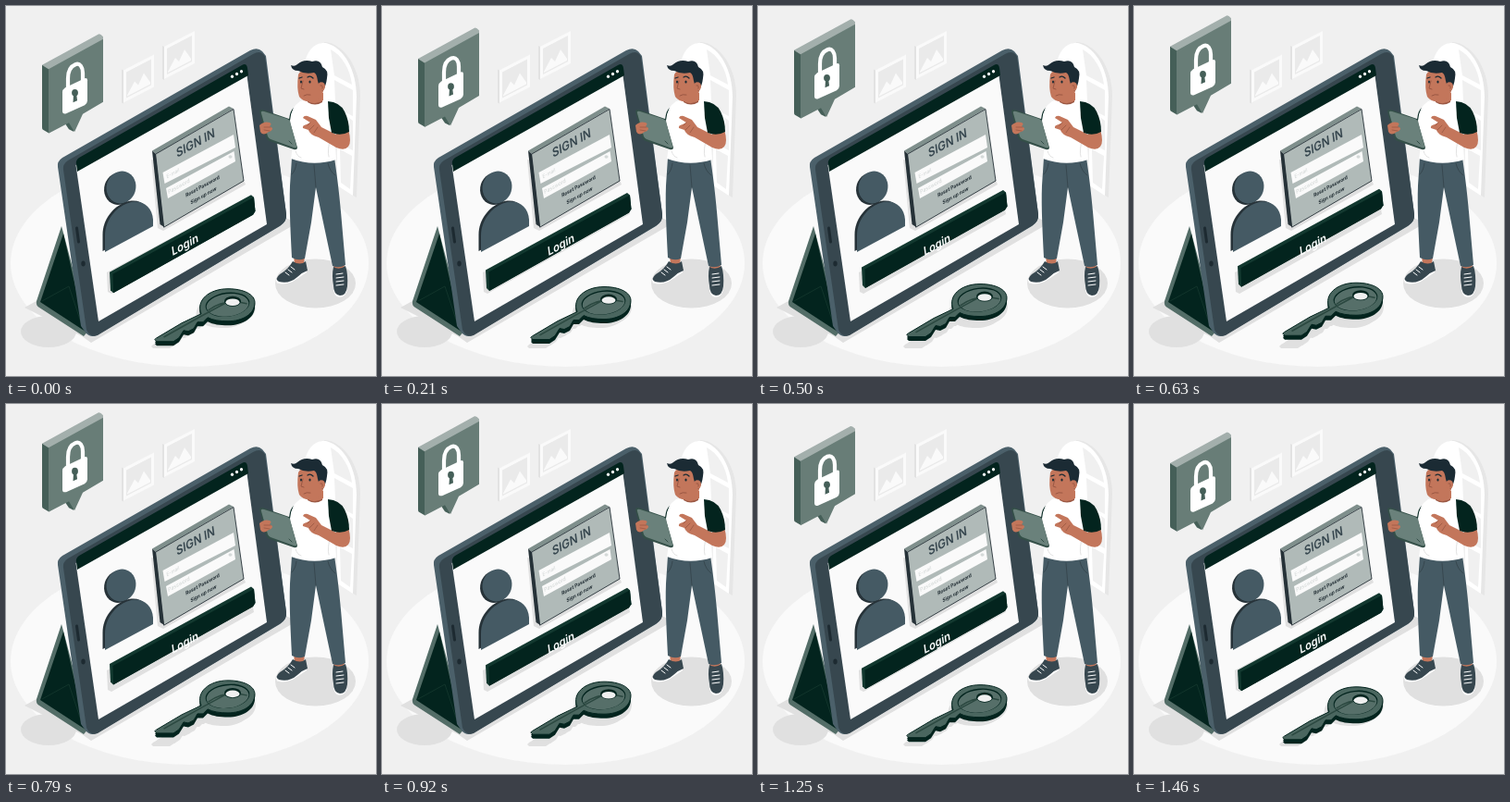
An HTML page with a canvas that plays this animation: 400x400 px, repeating every 1500 ms.

```html
<!DOCTYPE html>
<html lang="en">
<head>
<meta charset="utf-8">
<title>Sign in</title>
<style>
html, body { margin: 0; width: 100%; height: 100%; overflow: hidden; background: #f0f0f0; }
canvas { display: block; width: 100vw; height: 100vh; }
</style>
</head>
<body>
<canvas id="stage" width="400" height="400"></canvas>
<script>
const ctx = document.getElementById('stage').getContext('2d');
const LOOP = 1500, STEPS = 36;
const GREEN = '#03241e', SLATE = '#455a64', DARK = '#37474f', INK = '#263238';
const SHADE = '#e0e0e0', SKIN = '#c3765b', SKIN_DARK = '#9a5743';

function fill(color, d) {
  ctx.fillStyle = color;
  ctx.fill(new Path2D(d));
}

function line(color, width, d) {
  ctx.strokeStyle = color;
  ctx.lineWidth = width;
  ctx.lineCap = ctx.lineJoin = 'round';
  ctx.stroke(new Path2D(d));
}

function oval(color, x, y, rx, ry, turn = 0) {
  ctx.fillStyle = color;
  ctx.beginPath();
  ctx.ellipse(x, y, rx, ry, turn, 0, Math.PI * 2);
  ctx.fill();
}

function moved(dx, dy, draw) {
  ctx.save();
  ctx.translate(dx, dy);
  draw();
  ctx.restore();
}

// Text lying in the plane of the tilted screen, centred on x, y.
function label(text, x, y, font, color) {
  ctx.save();
  ctx.transform(0.84, -0.465, 0.13, 1, x, y);
  ctx.font = font;
  ctx.textAlign = 'center';
  ctx.textBaseline = 'middle';
  ctx.fillStyle = color;
  ctx.fillText(text, 0, 0);
  ctx.restore();
}

function picture() {
  fill('#e2e2e2', 'M-1 17L1 18V54L-1 53Z');
  fill('#fafafa', 'M1 18L34 1V36L1 53Z');
  fill('#eaeaea', 'M4 20L31 6V34L4 48Z');
  fill('#fafafa', 'M5 45L13 30L17 34L23 21L30 31V33L5 46Z');
}

function room() {
  fill('#f0f0f0', 'M0 0H400V400H0Z');
  oval('#fafafa', 198.5, 278, 193.5, 112);
  moved(126, 51.5, picture);
  moved(170, 26, picture);
  fill('#e6e6e6', 'M344 39C366 40 383 68 383 97L379 207L374 204Z');
  fill('#fff', 'M322 130V66C325 47 334 39 346 40C366 45 379 70 379 98L375 205L358 194V130Z');
  fill('#f0f0f0', 'M351 47C363 53 372 68 374 85L355 75Z');
  fill('#f0f0f0', 'M355 80L375 91V119L367 115L356 104Z');
  fill('#f0f0f0', 'M371 121L375 124V156L361 149V142L371 149Z');
  fill('#f0f0f0', 'M361 155L374 162L372 198L362 191Z');
  oval(SHADE, 46, 352, 30, 17);
  oval(SHADE, 334.5, 300, 43.5, 26.5);
  fill(SHADE, 'M20 326L60 304L290 222L314 235L92 364L82 357Z');
}

function tablet() {
  fill('#536d67', 'M60 238L33 319Q32 324 36 326L84 357L90 350Z');
  fill(GREEN, 'M62 246L37 320L86 352Z');
  line('#16392f', 0.8, 'M39 319L68 303L83 348');

  fill('#4b606a', 'M56 174Q55 168 61 164L264 48Q272 44 277 49L281 54L303 225Q304 233 296 238L98 356Q91 359 86 353L81 346Z');
  fill(DARK, 'M62 177Q61 171 67 167L267 52Q276 47 280 55L303 225Q304 232 297 237L99 356Q91 359 87 350Z');
  fill('#fafafa', 'M75.500 172L259 64L282 236L100 341Z');
  fill(GREEN, 'M76 171Q75 167 79 164L255 64Q260 61 261 67L262 75L77 179Z');
  for (let i = 0; i < 3; i++) oval('#fff', 244.5 + i * 5, 76.3 - i * 2.8, 1.6, 1.8);
  line('#1d2a31', 3, 'M76.5 240L78.5 255');
  oval('#1d2a31', 83.5, 278.5, 2.2, 3);
}

function avatar() {
  const body = 'M107 266V248C107 232 118 218 132 213C147 208 158 217 159 231V238Z';
  oval(INK, 122, 197.5, 15.8, 17.6, 0.3);
  oval(SLATE, 124.5, 196, 15.8, 17.6, 0.3);
  moved(-2.5, -1, () => fill(INK, body));
  fill(SLATE, body);
}

function form() {
  fill(SHADE, 'M157 166L164 240L170 243L259 193L257 188Z');
  fill('#7f8f8c', 'M158 156.500L241 108.500L246 111L162 160Z');
  fill(INK, 'M158 156.500L162 160L171 239L166.500 236Z');
  fill('#b0bab8', 'M162 160L246 111.500L257 189L171 239Z');
  line(INK, 0.9, 'M162 160L246 111.500L257 189L171 239Z');
  label('SIGN IN', 205, 148.5, '600 13.300px Inter, sans-serif', DARK);
  fill('#fafafa', 'M169.500 180L246 139L248 153L171.500 192Z');
  fill('#fafafa', 'M173 197L246.500 157L248 168L175 208Z');
  label('E-mail', 180.5, 181, '5.500px Inter, sans-serif', '#cfd4d3');
  label('Password', 187, 195, '6px Inter, sans-serif', '#cfd4d3');
  oval('#d5dad9', 242.5, 163, 2, 1.8);
  label('Reset Password', 212.5, 195, 'bold 5.600px Inter, sans-serif', INK);
  label('Sign up now', 213.5, 205, 'bold 5.600px Inter, sans-serif', INK);
}

function button(lift) {
  fill(SHADE, 'M109 288L264 205L268 225L114 311L110 309Z');
  moved(0, -lift, () => {
    fill('#12382f', 'M112 288L265 204.500L268 207L269.500 222L267 226L116 310.500L113 307.500Z');
    fill(GREEN, 'M115.500 290L268 207L269.500 222L267 226L116 310.500Z');
  });
  label('Login', 193.5, 258.5, '600 12.800px Inter, sans-serif', '#fff');
}

const KEY = 'M163 359L190 343L211 333C205 319 219 306 240 306C257 306 269 312 269 321C269 333 256 341 240 341C231 341 224 340 218 337L213 342L207 342L203 349L197 352L192 351L187 359L181 363H163L161 361Z';

function key(lift) {
  moved(-4, 7, () => fill(SHADE, KEY));
  moved(1, 4, () => fill(SHADE, KEY));
  moved(0, -lift, () => {
    moved(0, 4.5, () => fill(GREEN, KEY));
    moved(0, 2.5, () => fill(GREEN, KEY));
    fill('#4a665f', KEY);
    line(GREEN, 1, KEY);
    ctx.save();
    ctx.translate(239.5, 323);
    ctx.rotate(-0.12);
    oval(GREEN, 0, 0, 24, 13);
    oval('#566f69', 0, 0.6, 23, 12.2);
    ctx.restore();
    line('#2b4840', 1.5, 'M171 358L212 335L238 321M219 329Q237 316 260 322');
    oval(GREEN, 245, 319.5, 9, 5.5);
    oval('#f0f0f0', 245, 320.5, 7.5, 3.8);
  });
}

function bubble(lift) {
  moved(0, -lift, () => {
    fill('#a3afac', 'M39 64.500L100 31.200Q102 30.500 105 34V37L47 70Z');
    fill('#455f58', 'M39 64.500L46 69V138L40 134.500Q39 134 39 132Z');
    fill('#455f58', 'M62 125L68 134L73 136.500L73 122Z');
    fill('#687d77', 'M46 69L105 36.500V104.500L83 117.500L74 137L68 127L46 138.500Z');
    line('#fff', 4.2, 'M67 91V79C67 71 70 66 75 64C80 62 83 67 83 73V83');
    fill('#fff', 'M61 94Q61 91 64 89L85 79Q88 78 88 81V103Q88 106 85 108L65 117Q61 118 61 114Z');
    oval('#455f58', 74.5, 94.5, 3.4, 3.8);
    fill('#455f58', 'M73 96L76 95L77 103L72.500 105Z');
  });
}

function shoes() {
  fill(SKIN, 'M311 269H323L322 280L312 281ZM354 278H366L365 289L355 289Z');
  fill('#fff', 'M291.500 295L293 299.500Q302 302 310 298L325 288V284Z');
  fill(DARK, 'M310 276Q318 281 324 276L326 286Q320 288 315 293Q306 301 295 298Q290 295 296 290Q305 285 310 276Z');
  line('#fff', 1, 'M302 288L306 291M305 285L309 288M308 282L312 285');
  fill('#fff', 'M354 304Q354 315 361 315Q369 314 369 303Z');
  fill(DARK, 'M354 282Q360 286 367 281Q370 290 369 303Q368 313 361 313Q354 312 354 302Q352 291 354 282Z');
  line('#fff', 1, 'M357 290L364 289M357 294L365 293M357 298L365 297M357 302L365 301');
}

function man() {
  shoes();
  fill(SLATE, 'M309 164H355C358 184 361 208 363 234L367 280Q360 284 353 281L343 234L335 196L330 234L323 273Q316 276 309 272C308 250 306 218 307 194Z');
  line(DARK, 1, 'M333 172L335 196M314 170Q313 178 309 182M348 170Q350 179 356 183');

  fill(GREEN, 'M311 110Q307 113 306 123L309 128Z');
  fill('#fff', 'M318 103Q332 99 348 102Q356 105 356 118L355 141L357 166Q332 174 308 165L311 146L307 124Q308 109 318 103Z');
  line('#e2e2e2', 1, 'M313 157Q315 163 319 164M351 142Q347 156 349 163');
  fill(SKIN_DARK, 'M326 94H342V104Q334 109 326 104Z');
  fill(SKIN, 'M330 94H343V102Q335 107 328 104Z');

  // Head
  fill(SKIN, 'M316 74Q320 66 338 71L344 84Q344 100 332 103Q322 105 317 98Q314 89 316 74Z');
  fill('#1b2b34', 'M308 64Q312 66 315 63Q322 57 331 60Q340 57 342 66Q349 69 347 78Q346 87 342 92L339 88L337 81Q336 73 333 72Q323 74 316 70Q309 70 308 64Z');
  oval(SKIN, 341, 87, 4, 4.8);
  line(SKIN_DARK, 1, 'M340 86Q343 85 342 89M321 81L319 89L322 90M322 97Q325 95 329 96');
  line('#1b2b34', 1.3, 'M317 78L320 77M326 77Q329 75 332 78');
  oval('#1b2b34', 319, 82, 1, 1.5);
  oval('#1b2b34', 328.5, 82, 1.1, 1.6);

  // Tablet in hand
  fill('#344f48', 'M274 114Q274 112 277 112L306 122L315 153Q315 156 311 155L285 146Q282 145 281 142Z');
  fill('#6a817b', 'M276 116Q275 113 279 114L304 122Q306 123 307 125L314 151Q315 154 311 153L286 144Q284 143 283 141Z');
  line('#344f48', 1, 'M306 146L309 149');
  fill(SKIN, 'M274 129Q279 124 285 126Q288 127 285 130L288 132Q288 135 284 136Q278 141 275 136Z');
  line(SKIN_DARK, 0.8, 'M279 131L286 131M279 134L285 135');

  // Pointing arm
  fill(SKIN, 'M321 121Q322 118 326 119L335 123L341 131L357 139L358 132L370 133Q374 148 370 152Q366 157 357 153L338 142Q328 139 327 134L321 132Q320 129 325 128L329 126Z');
  line(SKIN_DARK, 0.8, 'M329 126L326 129M333 129L328 134M337 131L333 137');
  fill(GREEN, 'M348 103Q361 104 366 114Q371 124 371 136Q362 141 352 137L349 121Z');
}

// One triangle wave lifts every floating part, 24 steps a second.
function liftAt(time) {
  const step = Math.floor((time + 6) / (LOOP / STEPS)) % STEPS;
  const phase = ((step + 0.6) / STEPS) % 1;
  return 1 - Math.abs(1 - 2 * phase);
}

function draw(time) {
  const lift = liftAt(time % LOOP);
  room();
  tablet();
  avatar();
  form();
  button(lift * 7.8);
  key(lift * 7.8);
  bubble(lift * 24);
  man();
}

let start;
function tick(now) {
  start ??= now;
  draw(Math.max(0, now - start));
  requestAnimationFrame(tick);
}
draw(0);
requestAnimationFrame(tick);
</script>
</body>
</html>
```
